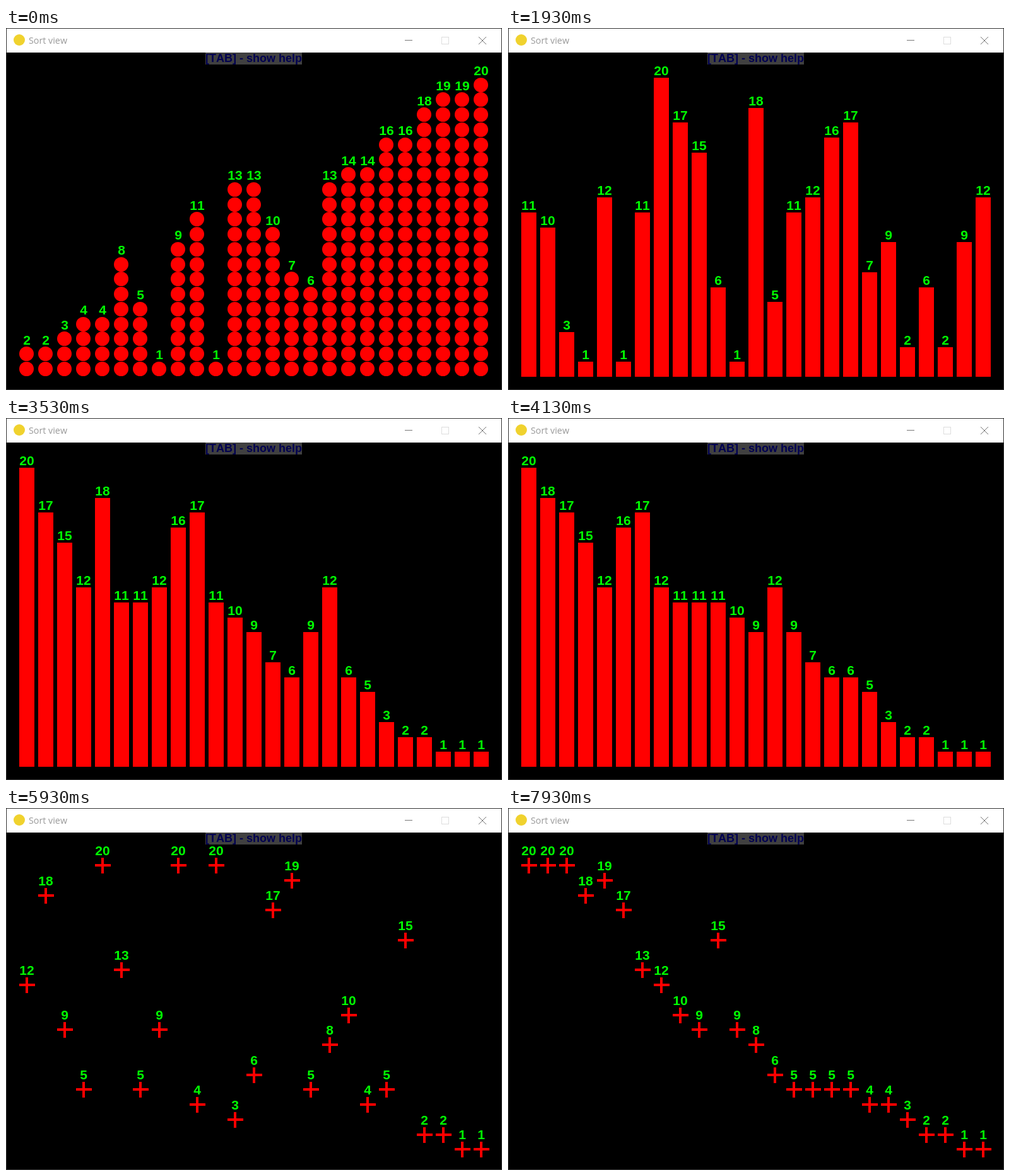
An HTML page with a canvas that plays this animation: 786x575 px, repeating every 8000 ms.

```html
<!DOCTYPE html>
<html lang="en">
<head>
<meta charset="utf-8">
<title>Sort view</title>
<style>
  html, body { margin: 0; width: 100%; height: 100%; overflow: hidden; background: #000; }
  canvas { display: block; }
</style>
</head>
<body>
<canvas id="stage" width="786" height="575"></canvas>
<script>
const ctx = document.getElementById('stage').getContext('2d');
const LOOP = 8000, PASS = 200;
const BASE = 554, UNIT = 23.75, LEFT = 21, PITCH = 30, SIZE = 24;

const ascending = (a, b) => a > b;
const descending = (a, b) => a < b;

// Each scene is a bubble sort; one full pass is shown per step.
const scenes = [
  { start: 0, draw: drawCircles, wrong: ascending, passAt: t => t < 70 ? 0 : t < 200 ? 1 : t < 530 ? 2 : 3 + Math.floor((t - 530) / PASS),
    values: [2, 2, 3, 4, 4, 8, 5, 1, 9, 11, 1, 13, 13, 10, 7, 6, 13, 14, 14, 16, 16, 18, 19, 19, 20] },
  { start: 1930, draw: drawBar, wrong: descending,
    values: [11, 10, 3, 1, 12, 1, 11, 20, 17, 15, 6, 1, 18, 5, 11, 12, 16, 17, 7, 9, 2, 6, 2, 9, 12] },
  { start: 5330, draw: drawCross, wrong: descending,
    values: [5, 1, 12, 4, 18, 9, 5, 20, 13, 2, 9, 20, 3, 20, 1, 6, 17, 19, 5, 8, 10, 4, 5, 15, 2] }
];

function bubble(values, passes, wrong) {
  const list = values.slice();
  for (let p = 0; p < passes; p++)
    for (let i = 0; i + 1 < list.length; i++)
      if (wrong(list[i], list[i + 1])) [list[i], list[i + 1]] = [list[i + 1], list[i]];
  return list;
}

function rect(color, x, y, w, h) {
  ctx.fillStyle = color;
  ctx.fillRect(x, y, w, h);
}

function disc(color, x, y, r) {
  ctx.fillStyle = color;
  ctx.beginPath();
  ctx.arc(x, y, r, 0, Math.PI * 2);
  ctx.fill();
}

function text(string, x, y, font, color, align) {
  ctx.font = font;
  ctx.fillStyle = color;
  ctx.textAlign = align;
  ctx.fillText(string, x, y);
}

const topOf = value => Math.round(BASE - value * UNIT);

function drawCircles(x, value) {
  for (let k = 1; k <= value; k++) disc('#f00', x + 11.5, Math.floor(BASE - k * UNIT) + 11.5, 11.5);
}

function drawBar(x, value) {
  const top = topOf(value);
  rect('#f00', x, top, SIZE, BASE - top);
}

function drawCross(x, value) {
  const top = topOf(value);
  rect('#f00', x, top + 10, SIZE + 1, 4);
  rect('#f00', x + 10, top, 4, SIZE + 1);
}

function drawWindow() {
  rect('#333', 0, 0, 786, 575);
  rect('#000', 1, 1, 784, 573);
  rect('#fff', 1, 1, 784, 38);
  disc('#f0d22e', 21, 19, 9);
  text('Sort view', 36, 25, '14.3px "Open Sans", sans-serif', '#999', 'left');

  ctx.lineWidth = 1;
  rect('#777', 632, 19, 12, 1);
  ctx.strokeStyle = '#ddd';
  ctx.strokeRect(690.5, 14.5, 11, 11);
  ctx.strokeStyle = '#777';
  ctx.beginPath();
  ctx.moveTo(749, 14); ctx.lineTo(761, 26);
  ctx.moveTo(761, 14); ctx.lineTo(749, 26);
  ctx.stroke();

  rect('#404040', 316, 39, 153, 19);
  text('[TAB] - show help', 316, 54, 'bold 18px "Liberation Sans", sans-serif', '#000050', 'left');
}

function render(t) {
  const scene = scenes.filter(s => s.start <= t).pop();
  const passes = scene.passAt ? scene.passAt(t) : Math.floor((t - scene.start) / PASS);
  drawWindow();
  bubble(scene.values, passes, scene.wrong).forEach((value, i) => {
    const x = LEFT + i * PITCH;
    scene.draw(x, value);
    text(value, x + 12, topOf(value) - 4, 'bold 21px "Liberation Sans", sans-serif', '#0f0', 'center');
  });
}

ctx.fontKerning = 'none';
const begin = performance.now();
function tick() {
  render((performance.now() - begin) % LOOP);
  requestAnimationFrame(tick);
}
tick();
</script>
</body>
</html>
```
